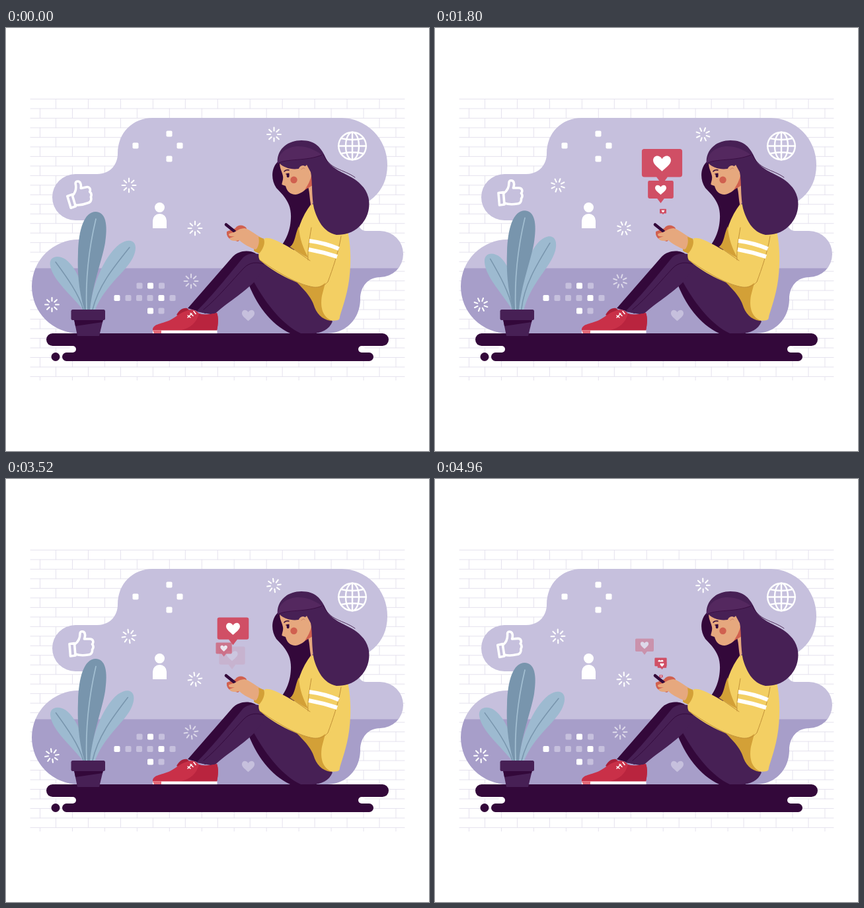
An HTML page that plays this animation: 640x640 px, repeating every 5 s.

```html
<!DOCTYPE html>
<html lang="en">
<head>
<meta charset="utf-8">
<title>Scrolling the feed</title>
<style>
html, body { margin: 0; width: 100%; height: 100%; overflow: hidden; background: #fff; }
svg { display: block; width: 100vw; height: 100vh; }
.line { fill: none; stroke-linecap: round; stroke-linejoin: round; }
.dark { fill: #33083a; }
.plum { fill: #472055; }
.skin { fill: #e6a87e; }
.blush { fill: #d0604f; }
.sun { fill: #f3cf63; }
.gold { fill: #d3a037; }
.sky { fill: #9dbad0; }
.slate { fill: #7895ad; }
.lilac { fill: #c6c0dd; }
.white { fill: #fff; }
</style>
</head>
<body>
<svg viewBox="0 0 640 640">
  <defs>
    <clipPath id="blob"><path d="M222 136H507A70 71 0 0 1 577 207C577 234 565 252 546 264C528 277 528 307 545 307H566A35 35 0 0 1 566 377C548 377 536 391 536 410C536 440 514 462 486 462H110A71 71 0 0 1 110 320H120A14.5 14.5 0 0 0 120 291H105A35 35 0 0 1 105 221H138C157 221 169 207 169 190C169 158 192 136 222 136Z"/></clipPath>
    <path id="heart" d="M0 12.5C-6 7-14.5 1-14.5-5C-14.5-14-4-15 0-7.5C4-15 14.5-14 14.5-5C14.5 1 6 7 0 12.5Z"/>
    <g id="bubble">
      <path fill="#d04f65" d="M-29-23H29Q33-23 33-19V19Q33 23 29 23H9L0 35L-9 23H-29Q-33 23-33 19V-19Q-33-23-29-23Z"/>
      <use href="#heart" fill="#fff" y="1"/>
    </g>
  </defs>

  <path id="wall" class="line" stroke="#e5e2ee"/>
  <g clip-path="url(#blob)">
    <rect class="lilac" x="30" y="130" width="580" height="234"/>
    <rect fill="#a79ec9" x="30" y="363.500" width="580" height="99"/>
  </g>

  <g class="dark">
    <rect x="61" y="462" width="518" height="19" rx="9.500"/>
    <rect x="101" y="478" width="437" height="16"/>
    <rect x="85" y="491" width="471" height="13" rx="6.500"/>
    <circle cx="75" cy="497.500" r="6.500"/>
  </g>
  <circle class="white" cx="101" cy="486" r="5"/>
  <circle class="white" cx="538" cy="486" r="5"/>

  <g id="dots"></g>
  <g id="bursts"></g>
  <use href="#heart" class="lilac" transform="translate(366.500 435) scale(.66)"/>
  <circle class="white" cx="232.500" cy="271.500" r="7.500"/>
  <path class="white" d="M222 303V291.500A10.500 10.500 0 0 1 243 291.500V303Z"/>
  <g class="line" stroke="#fff" stroke-width="2.400">
    <circle cx="524" cy="178.500" r="20.800"/>
    <ellipse cx="524" cy="178.500" rx="10" ry="20.800"/>
    <path d="M524 158V199M503 178.500H545M507 167Q524 171 541 167M507 190Q524 186 541 190"/>
  </g>
  <g id="thumb" class="line" stroke="#fff" stroke-width="3.600">
    <path d="M96 249.500L103.500 248.500L105 267L97.500 268Z"/>
    <path d="M104 250C110 246 112 241 112 234C112 229 119 230 119.500 235C120 238 119 240 118.500 242H127C132 242 133 247 130.500 250C133 253 132 256 130.500 258C131 262 129 266 124 266C118 267 111 267 105 265"/>
  </g>

  <g id="leftLeaf">
    <path class="sky" d="M118 428C100 405 71 382 67 360C64 346 78 342 90 350C110 365 120 400 123 428Z"/>
    <path class="line" stroke="#7895ad" stroke-width="1.500" d="M75 354C92 377 110 402 117 426"/>
  </g>
  <g id="rightLeaf">
    <path class="sky" d="M127 428C128 395 148 345 172 327C188 316 200 323 195 340C188 366 152 384 134 428Z"/>
    <path class="line" stroke="#7895ad" stroke-width="1.500" d="M187 332C162 363 140 390 131 426"/>
  </g>
  <g id="midLeaf">
    <path class="slate" d="M119 428C109 395 108 365 109 340C110 305 118 278 136 278C154 279 153 305 150 325C146 350 130 390 127 428Z"/>
    <path class="line" stroke="#a3bfd2" stroke-width="1.700" d="M136 289C125 335 120 380 122 428"/>
  </g>
  <path class="plum" d="M103 441H147L141 466H108Z"/>
  <path class="dark" d="M103 441H147L146 445L105 451Z"/>
  <rect class="plum" x="98.500" y="426" width="51.500" height="16" rx="2.500"/>

  <!-- legs and shoe -->
  <path class="dark" d="M275 424L343 346C352 337 366 335 378 341L365 365L302 432Z"/>
  <path class="dark" d="M365 382C378 418 400 448 430 462H470L440 395Z"/>
  <path class="plum" d="M369 361C390 345 420 362 445 381C466 400 472 425 494 444C489 456 478 462 462 462H446C420 450 395 420 375 384Z"/>
  <path class="plum" d="M288 429C315 402 344 365 359 347C370 337 391 341 400 353L376 384C352 407 330 418 315 434Z"/>
  <path class="line" stroke="#33083a" stroke-width=".9" d="M299 426C320 409 344 380 360 363C369 354 379 354 390 357"/>
  <path fill="#a92039" d="M258 434C262 427 267 423 274 424L282 431L270 440Z"/>
  <path fill="#c93048" d="M222 458C221 448 234 448 246 443C257 438 264 430 273 428C280 425 287 426 292 432C301 435 311 433 319 431C322 438 321 449 319 458Z"/>
  <path fill="#b9243e" d="M292 432C301 435 311 433 319 431C322 438 321 449 319 458H262C280 454 288 446 292 432Z"/>
  <path class="line" stroke="#fff" stroke-width="1.500" d="M275 435L279 438M279 431.500L283 435.500M284 428.500L287 432.500M275 438L281 432"/>
  <path class="white" d="M222 457.500H319.500V462H222Z"/>
  <path fill="#e46a78" d="M222 457.500H235V462H224Z"/>

  <!-- hair behind the body -->
  <path class="dark" d="M414 200C401 209 400 229 409 242C424 257 432 268 431 288C430 310 422 322 414 334L440 338L465 268L456 230Z"/>
  <path class="line" stroke="#33083a" stroke-width="1" d="M424 252C437 275 437 300 422 326"/>

  <!-- sweater -->
  <path class="sun" d="M462 266C447 285 439 310 436 335V377C452 394 463 405 468 422C474 438 487 445 502 442Q505 441 505 437C508 424 520 398 521 358C522 335 519 315 516 303L475 270Z"/>
  <path class="gold" d="M443 300C437 312 438 324 430 331L458 349C450 333 444 320 443 300Z"/>
  <path class="gold" d="M430 373C445 392 461 402 467 423C472 436 483 443 494 443C479 438 475 423 478 405L484 382Z"/>
  <path class="gold" d="M376 314L390 319C393 326 388 336 383 341L375 337Z"/>
  <path class="sun" d="M463 300C484 290 510 318 506 334L493 370C488 384 478 393 465 392C440 388 402 368 384 351C379 344 386 323 392 318C405 315 430 334 458 348Z"/>
  <path class="line" stroke="#c29138" stroke-width="1" d="M462 302C459 320 456 337 457 351M430 331L460 352M507 315C503 340 494 365 487 384C481 391 474 393 465 392C446 389 420 376 384 351"/>
  <path class="line" stroke="#fff" stroke-width="6.200" style="stroke-linecap:butt" d="M459 322Q482 325 503.500 334M458 335Q480 339 501 346"/>

  <!-- head -->
  <path class="skin" d="M414 203C414 213 418 218 419 224C420 230 417 234 417.500 237L423 239C425 247 430 252 438 252C446 251 452 246 457 240C460 250 459 260 462 270L472 245L467 204L440 198Z"/>
  <path class="blush" d="M463 218C461 232 456 238 452 245L464 238Z"/>
  <circle class="blush" cx="435.500" cy="229.800" r="5.200"/>
  <ellipse class="dark" cx="426.600" cy="223" rx="2" ry="3.300"/>
  <path class="line" stroke="#33083a" stroke-width="1.400" d="M421 217Q423 214 428 215M424 221L428 220.500"/>
  <path class="plum" d="M411 207C408 184 426 170 447 170C468 170 477 181 484 197C494 218 521 220 537 237C553 252 552 275 543 290C532 308 516 313 500 313C480 309 471 290 466 273C462 255 464 232 461 218L455 207C447 216 424 216 413 204Z"/>
  <path fill="#54285f" d="M411 205C412 180 446 168 478 192C455 202 424 199 411 205Z"/>
  <path class="line" stroke="#33083a" stroke-width=".8" d="M411 205C424 197 455 202 478 192M480 191C490 215 510 213 528 226"/>
  <path class="skin" d="M443 217C441 209 451 205 454 211C457 216 452 221 448 222Z"/>
  <path class="line" stroke="#c67961" stroke-width=".8" d="M447 214Q450 210 452 213"/>

  <g id="bubbles"></g>

  <!-- hands and phone -->
  <path class="blush" d="M334 308L347 303C350 297 360 297 364 303L361 313L351 323L340 320Q333 316 334 308Z"/>
  <path class="line" stroke="#33083a" stroke-width="4.600" d="M333 297.500L346 308"/>
  <path class="skin" d="M390 319C380 315 370 305 361 303C354 303 349 307 345 309L338 311C335 314 339 316 346 315L338 318C339 322 346 323 353 321C359 327 369 332 377 335L383 333Z"/>
  <path class="gold" d="M382 316L390 319C393 326 388 336 383 341L376 338C382 332 384 324 382 316Z"/>
</svg>
<script>
const NS = 'http://www.w3.org/2000/svg';
const LOOP = 5000, STEP = 40;
const $ = id => document.getElementById(id);

function add(parent, tag, attrs) {
  const el = document.createElementNS(NS, tag);
  for (const k in attrs) el.setAttribute(k, attrs[k]);
  return parent.appendChild(el);
}

// Brick wall
const rowH = 14.48;
let wall = '';
for (let r = 0; r < 30; r++) {
  const y = 107.5 + r * rowH, h = r === 29 ? 5.5 : rowH;
  wall += `M37 ${y}H603`;
  for (let x = r % 2 ? 51.5 : 75.5; x < 603; x += 48.95) wall += `M${x} ${y}v${h}`;
}
$('wall').setAttribute('d', wall);

// Squares: y, then x positions; negative x marks a dim square
[[160, 247], [178, 196, 263], [198, 247],
 [390, -202, 218.5, -235.5], [408.5, 168, -185, -201.5, -218, 235, -252], [428, 218.5, -235]]
  .forEach(([y, ...xs]) => xs.forEach(x => add($('dots'), 'rect', {
    x: Math.abs(x) - 4.5, y: y - 4.5, width: 9, height: 9, rx: 1.8,
    class: x < 0 ? 'lilac' : 'white'
  })));

// Ray bursts
let rays = '';
for (let i = 0; i < 8; i++) {
  const c = Math.cos(i * Math.PI / 4), s = Math.sin(i * Math.PI / 4);
  rays += `M${5.5 * c} ${5.5 * s}L${10.4 * c} ${10.4 * s}`;
}
const bursts = [[405.5, 161, 1], [186, 238, 1], [286, 303, 1], [280, 383, .6], [69.5, 418.5, 1]]
  .map(([x, y, opacity]) => ({
    x, y,
    el: add($('bursts'), 'path', { d: rays, class: 'line', stroke: '#fff', 'stroke-width': 2.1, opacity })
  }));

// Bubbles: start and period in seconds, pose from progress u
const clamp = v => Math.max(0, Math.min(1, v));
const bubbles = [
  { start: 0, period: 1.165, pose: u => [341.5, 306 - 113 * u, 71 * u, (1 - u) / .11] },
  { start: .968, period: .952, pose: u => [343.5, 303 - 113 * u, 70 * u, (1 - u) / .11] },
  { start: 1.04, period: .962, pose: u => [342, 303 - 62 * u, 68 * u, (.6 - u) / .2] },
  { start: 0, period: 1.36, pose: u => {
    const drift = clamp((u - .42) / .227);
    return [345 - 28 * drift * drift, 303 - 80 * u, 28 * (u / .647) ** 1.5, (.74 - u) / .23];
  } }
].map(b => ({ ...b, el: add($('bubbles'), 'use', { href: '#bubble' }) }));

const swing = (t, period) => .5 - .5 * Math.cos(2 * Math.PI * t / period);
const turn = (el, deg, x, y) => el.setAttribute('transform', `rotate(${deg} ${x} ${y})`);

function draw(t) {
  turn($('leftLeaf'), 6.5 * swing(t, 5 / 7), 120, 428);
  turn($('rightLeaf'), -7.6 * swing(t + .04, 1.25), 130, 428);
  $('midLeaf').setAttribute('transform',
    `translate(0 428) scale(1 ${1 + .04 * swing(t + .02, 1)}) translate(0 -428)`);

  const beat = Math.abs(t - Math.round(t));
  turn($('thumb'), -12 * Math.exp(-26 * beat), 118, 267);

  for (const b of bursts)
    b.el.setAttribute('transform', `translate(${b.x} ${b.y}) rotate(${36 * t})`);

  for (const b of bubbles) {
    const age = t - b.start;
    const [x, y, w, alpha] = b.pose(age > 0 ? age % b.period / b.period : 0);
    b.el.setAttribute('transform', `translate(${x} ${y}) scale(${w / 66})`);
    b.el.setAttribute('opacity', age > 0 ? clamp(alpha) : 0);
  }
}

const begin = performance.now();
function tick() {
  const ms = (performance.now() - begin) % LOOP;
  draw(Math.floor(ms / STEP) * STEP / 1000);
  requestAnimationFrame(tick);
}
tick();
</script>
</body>
</html>
```
